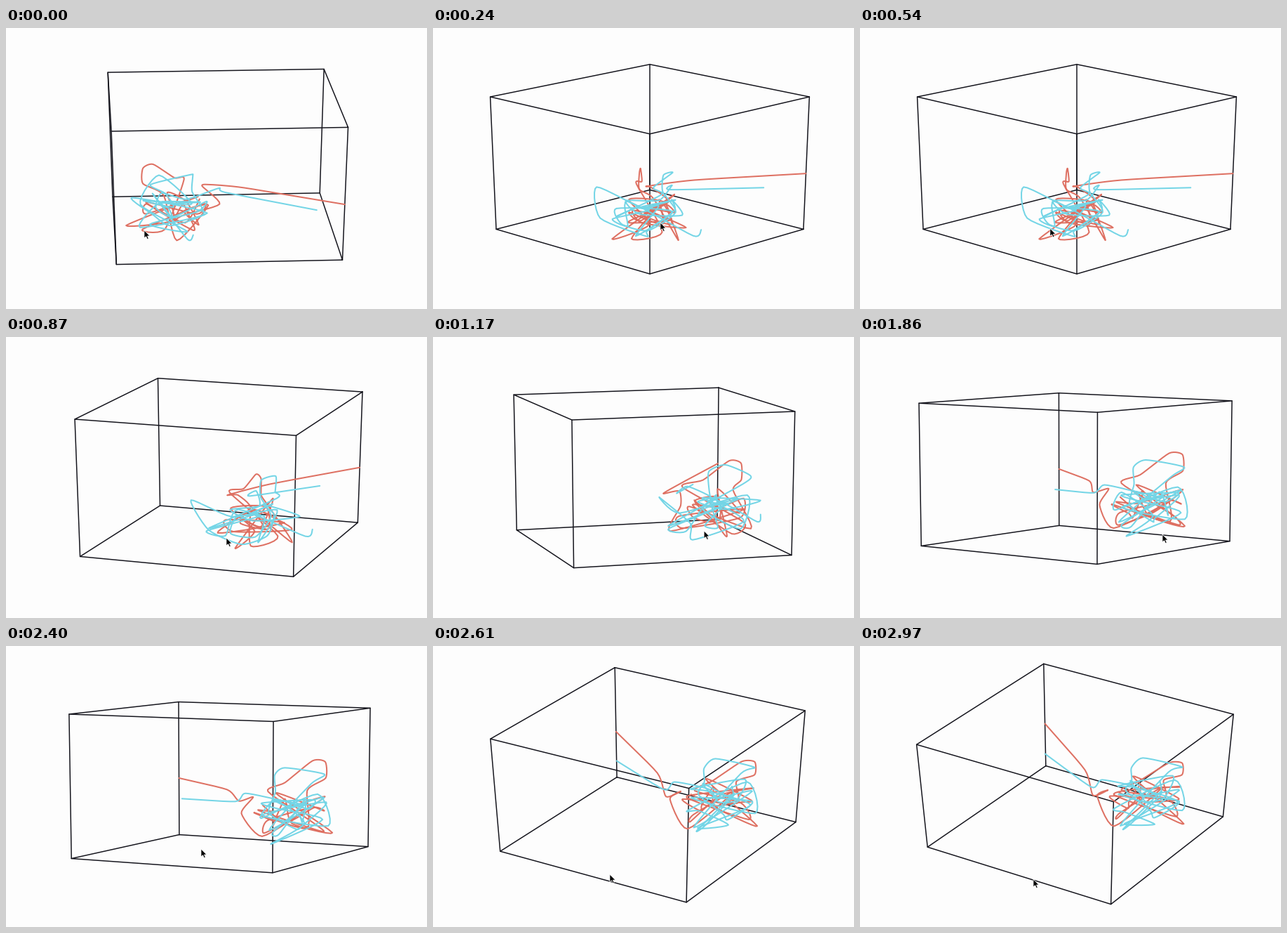
Animation, 600 px wide and 400 px high, one loop 3000 ms. Source, as a matplotlib script:

```python
import numpy as np
import matplotlib.pyplot as plt
from matplotlib.animation import FuncAnimation
from matplotlib.patches import Polygon

W, H, FRAMES, STEP = 600, 400, 100, 30
CENTER = np.array([309, 194])
FOCAL = np.array([3155, -2036])
DIST = 20
DRAG = np.array([465, 308]) / 180  # pointer pixels per degree
rng = np.random.default_rng(5)

# Stops of the view: arrive, leave, (turn, elevation), pointer tip
STOPS = [(0, 0, (48.5, 26.2), (197, 288)),
         (240, 670, (90, 22.3), (324, 277)),
         (870, 870, (115.6, 20.6), (314, 286)),
         (1140, 1640, (152.5, 13), (389, 275)),
         (1860, 2270, (187, 8.3), (431, 281)),
         (2400, 2400, (197.4, 8.6), (278, 289)),
         (2650, 2970, (192.4, 44.3), (247, 332))]


def timeline():
    """Times, poses and pointer places; a held view lets the pointer go back."""
    keys = []
    for i, (arrive, leave, pose, tip) in enumerate(STOPS):
        keys.append((arrive, *pose, *tip))
        if leave > arrive:
            grab = tip
            if i + 1 < len(STOPS):
                _, _, pose2, tip2 = STOPS[i + 1]
                grab = np.array(tip2) - np.subtract(pose2, pose) * DRAG
            keys.append((leave, *pose, *grab))
    return np.array(keys).T


def wander(n):
    """Random stops inside the tangled region."""
    return rng.uniform((-.34, .34, -.76), (.32, .98, -.18), (n, 3))


def curve(*parts, n=8, pull=.32):
    """Smooth path through all stops, nearly straight between turns."""
    p = np.vstack(parts)
    m = pull * (np.vstack([p[1:], p[-1:]]) - np.vstack([p[:1], p[:-1]]))
    k = np.linspace(0, 1, n)[:, None]
    s = k * k * (3 - 2 * k)
    return np.vstack([
        a + (b - a) * s + k * (1 - k) * (ma * (1 - k) - mb * k)
        for a, b, ma, mb in zip(p, p[1:], m, m[1:])])


def project(pts, turn, elev):
    t, e = np.radians((turn, elev))
    a, b, z = pts.T
    u = a * np.sin(t) - b * np.cos(t)
    v = a * np.cos(t) + b * np.sin(t)
    depth = DIST - v * np.cos(e) - z * np.sin(e)
    flat = np.column_stack([u, z * np.cos(e) - v * np.sin(e)])
    return CENTER + FOCAL * flat / depth[:, None]


# Entry path, upper loop and tangle of each track
warm = curve(
    [(1.414, 0, -.14), (.4, .165, -.17), (-.02, .147, -.27),
     (.01, .293, -.225), (.165, .23, -.48), (-.2, .31, -.75)],
    wander(9),
    [(-.12, .39, -.13), (-.07, .57, -.02), (-.08, .83, .28),
     (-.09, .95, .26), (-.09, .955, .03), (.03, .82, -.16)],
    wander(13))
cool = curve(
    [(1.04, -.08, -.39), (.186, .178, -.31), (.2, .28, -.2)],
    wander(7),
    [(-.03, .45, -.9), (-.44, .63, -.54), (-.475, .34, -.2)],
    wander(8),
    [(.114, .54, -.185), (.12, .535, .06), (.2, .66, .15),
     (.03, .986, .067), (.1, .88, -.08)],
    wander(9),
    [(.38, .9, -.68), (.45, .9, -.59)])

ring = [(2 ** .5 * np.cos(q), 2 ** .5 * np.sin(q))
        for q in np.arange(5) * np.pi / 2]
edges = [np.array([(*p, z) for p in ring]) for z in (1, -1)]
edges += [np.array([(*p, 1), (*p, -1)]) for p in ring[:4]]

fig = plt.figure(figsize=(W / 100, H / 100), dpi=100, facecolor="#fdfdfd")
ax = fig.add_axes([0, 0, 1, 1])
ax.set(xlim=(0, W), ylim=(H, 0))
ax.axis("off")


def stroke(color, width):
    return ax.plot([], [], color=color, lw=width * .72,
                   solid_joinstyle="round", solid_capstyle="round")[0]


shapes = [(stroke("#14141c", 1.5), pts) for pts in edges]
shapes += [(stroke("#de7062", 2), warm), (stroke("#74d5e6", 2), cool)]
arrow = np.array([(0, 0), (0, 11), (2.6, 8.7), (4.4, 12.6), (6.2, 11.8),
                  (4.5, 8), (8, 8)])
pointer = ax.add_patch(Polygon(arrow, fc="black", ec="white", lw=.5, zorder=5))
times, *tracks = timeline()


def draw(frame):
    turn, elev, x, y = (np.interp(frame * STEP, times, tr) for tr in tracks)
    for line, pts in shapes:
        line.set_data(*project(pts, turn, elev).T)
    pointer.set_xy(arrow + (x, y))
    return [line for line, _ in shapes] + [pointer]


anim = FuncAnimation(fig, draw, frames=FRAMES, interval=STEP, repeat=True,
                     repeat_delay=0)
plt.show()
```
